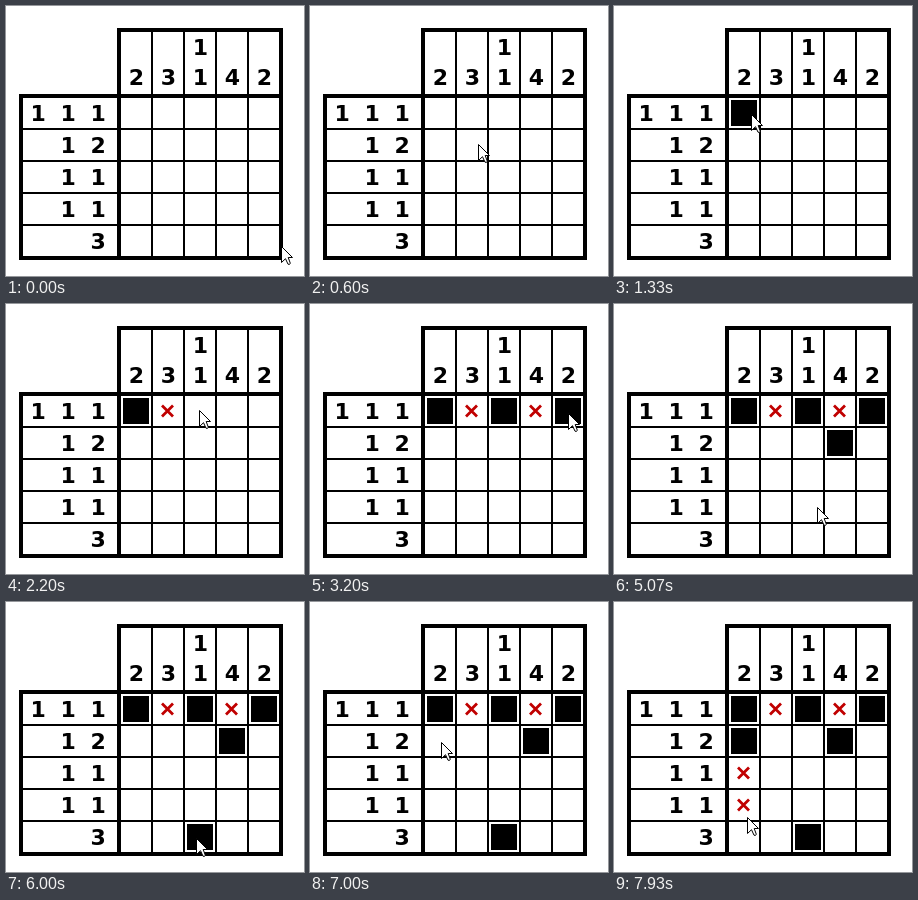
An HTML page that plays this animation: 298 px wide and 270 px high, repeating every 8000 ms.

```html
<!DOCTYPE html>
<html lang="en">
<head>
<meta charset="utf-8">
<title>Nonogram</title>
<style>
  html, body { margin: 0; width: 100%; height: 100%; overflow: hidden; background: #fff; }
  svg { display: block; width: 298px; height: 270px; }
  text { font: bold 22px Verdana, "DejaVu Sans", sans-serif; text-anchor: middle; }
  .block { fill: #000; shape-rendering: crispEdges; }
  .cross { fill: none; stroke: #c00000; stroke-width: 2.8; }
  #cursor { fill: #fff; stroke: #000; stroke-linejoin: round; }
</style>
</head>
<body>
<svg viewBox="0 0 298 270">
  <g id="board"></g>
  <g id="marks"></g>
  <path id="cursor" d="M.5 .5V16.5L4.5 12.7 7 18.2 8.5 18.4 9.3 17.2 7.2 11.5H11.5Z"/>
</svg>
<script>
const FPS = 15, FRAMES = 120, PITCH = 32, LEFT = 115, TOP = 92;
const solution = ['#.#.#', '#..##', '.#.#.', '.#.#.', '.###.'];

// Pointer stops: x, y, tick of the click. The first and last only place the pointer.
const stops = [
  [275, 240, -1],
  [137, 108, 20], [169, 106, 26], [194, 106, 36], [225, 104, 41], [258, 109, 48],
  [228, 136, 67], [190, 236, 90],
  [131, 140, 106], [133, 172, 111], [133, 203, 115],
  [133, 215, 119]
];

const board = document.getElementById('board');
const marks = document.getElementById('marks');
const cursor = document.getElementById('cursor');

function add(parent, tag, attrs, text = '') {
  const el = document.createElementNS('http://www.w3.org/2000/svg', tag);
  for (const name in attrs) el.setAttribute(name, attrs[name]);
  el.textContent = text;
  return parent.appendChild(el);
}
const box = (x, y, width, height, parent = board) =>
  add(parent, 'rect', { x, y, width, height, class: 'block' });
const clue = (x, y, digit) => add(board, 'text', { x, y }, digit);
const runs = line => line.match(/#+/g).map(run => run.length).reverse();

function drawBoard() {
  for (let i = 1; i < 5; i++) {
    box(LEFT - 2 + i * PITCH, 22, 2, 232);
    box(13, TOP - 2 + i * PITCH, 264, 2);
  }
  for (const x of [111, 273]) box(x, 22, 4, 232);
  for (const y of [88, 250]) box(13, y, 264, 4);
  box(111, 22, 166, 4);
  box(13, 88, 4, 166);

  solution.forEach((line, i) => {
    const column = solution.map(row => row[i]).join('');
    runs(column).forEach((n, k) => clue(130.5 + i * PITCH, 79 - k * 30, n));
    runs(line).forEach((n, k) => clue(92.2 - k * 30, 115 + i * PITCH, n));
  });
}

// A click fills the cell under the pointer, or crosses it out if it stays empty.
function makeMark([x, y, tick]) {
  const col = Math.floor((x - LEFT) / PITCH);
  const row = Math.floor((y - TOP) / PITCH);
  const cellX = LEFT + 2 + col * PITCH;
  const cellY = TOP + 2 + row * PITCH;
  const el = solution[row][col] === '#'
    ? box(cellX, cellY, 26, 26, marks)
    : add(marks, 'path', { class: 'cross', d: `M${cellX + 7} ${cellY + 7.5}l11 11m0-11l-11 11` });
  return { tick, el };
}

// Each move starts just after a click and settles before the next one.
function pointerAt(tick) {
  let [x, y, clicked] = stops[0];
  for (const [toX, toY, click] of stops.slice(1)) {
    const depart = clicked + 1;
    if (tick <= depart) break;
    const travel = Math.min(13, Math.round((click - depart) * 0.8));
    const p = Math.min(1, (tick - depart) / travel);
    const eased = p * p * (3 - 2 * p);
    x += (toX - x) * eased;
    y += (toY - y) * eased;
    clicked = click;
  }
  return [Math.round(x), Math.round(y)];
}

drawBoard();
const cells = stops.slice(1, -1).map(makeMark);

function draw(now) {
  // Small lead keeps ticks on the 10 ms clock.
  const tick = Math.floor((now + 4) * FPS / 1000) % FRAMES;
  for (const cell of cells) {
    cell.el.setAttribute('visibility', tick >= cell.tick ? 'visible' : 'hidden');
  }
  cursor.setAttribute('transform', `translate(${pointerAt(tick)})`);
}

let origin;
function loop(now) {
  origin ??= now;
  draw(now - origin);
  requestAnimationFrame(loop);
}
draw(0);
requestAnimationFrame(loop);
</script>
</body>
</html>
```
